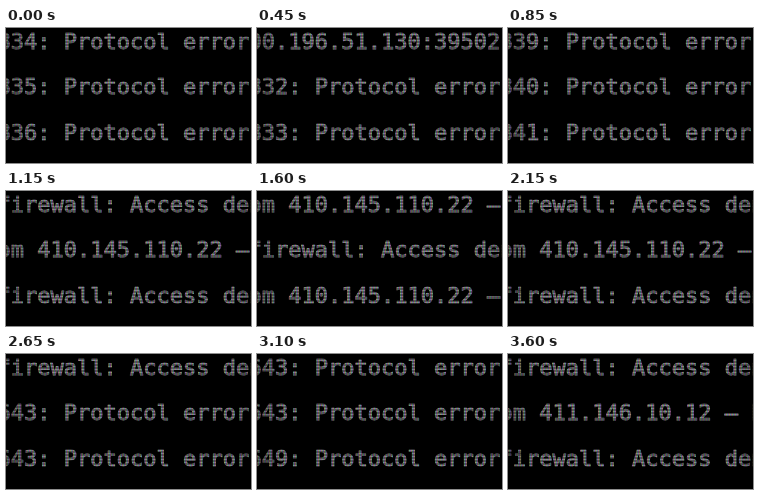
Write an HTML page with a canvas that moves like this. It is 245 px wide and 135 px high and loops after 3.65 s.

```html
<!DOCTYPE html>
<html lang="en">
<head>
<meta charset="utf-8">
<title>Scrolling log</title>
<style>
  html, body { margin: 0; width: 100%; height: 100%; overflow: hidden; background: #000; }
  canvas { display: block; }
</style>
</head>
<body>
<canvas id="stage" width="245" height="135"></canvas>
<script>
const W = 245, H = 135;
const STEP = 50, STEPS = 73;
const LEFT = -8.4, BASELINE = 21, LINE_HEIGHT = 45.4;
const ctx = document.getElementById('stage').getContext('2d');

const protocolError = port => `${port}: Protocol error from`;

function firewallLine(showAddress, address) {
  return showAddress ? `om ${address} – blocked` : 'firewall: Access denied';
}

// The log moves up by one whole line per step.
function logLine(i) {
  if (i < 9) return protocolError(834 + i);
  if (i === 9) return '00.196.51.130:39502';
  if (i < 22) return protocolError(822 + i);
  if (i < 54) return firewallLine(i % 2 === 0, '410.145.110.22');
  if (i < 64) return protocolError(643);
  if (i < 70) return protocolError(585 + i);
  return firewallLine(i % 2 === 1, '411.146.10.12');
}

// Screen phosphor: tinted columns, dark rows and dimmer edges.
function makeScreen() {
  const screen = document.createElement('canvas');
  screen.width = W;
  screen.height = H;
  const g = screen.getContext('2d');
  const image = g.createImageData(W, H);
  const wave = phase => Math.cos(2 * Math.PI * phase);
  for (let y = 0; y < H; y++) {
    const row = 0.76 + 0.24 * wave(y / 3);
    for (let x = 0; x < W; x++) {
      const edge = Math.min(1, 0.75 + x / 100, 0.8 + (W - x) / 100);
      const p = 4 * (y * W + x);
      for (let c = 0; c < 3; c++) {
        image.data[p + c] = 255 * row * edge * (0.78 + 0.22 * wave(x / 2.9 - c / 3));
      }
      image.data[p + 3] = 255;
    }
  }
  g.putImageData(image, 0, 0);
  return screen;
}

const screen = makeScreen();

function draw(step) {
  ctx.globalCompositeOperation = 'source-over';
  ctx.fillStyle = '#000';
  ctx.fillRect(0, 0, W, H);
  ctx.font = '22px "DejaVu Sans Mono", monospace';
  ctx.fillStyle = ctx.strokeStyle = '#a9a9b0';
  ctx.lineWidth = 1.1;
  ctx.lineJoin = 'round';
  ctx.filter = 'blur(0.5px)';
  for (let row = 0; row < 3; row++) {
    const line = logLine(step + row), y = BASELINE + row * LINE_HEIGHT;
    ctx.fillText(line, LEFT, y);
    ctx.strokeText(line, LEFT, y);
  }
  ctx.filter = 'none';
  ctx.globalCompositeOperation = 'multiply';
  ctx.drawImage(screen, 0, 0);
}

const start = performance.now();
function tick() {
  const elapsed = performance.now() - start;
  draw(Math.floor(elapsed / STEP) % STEPS);
  requestAnimationFrame(tick);
}
tick();
</script>
</body>
</html>
```
